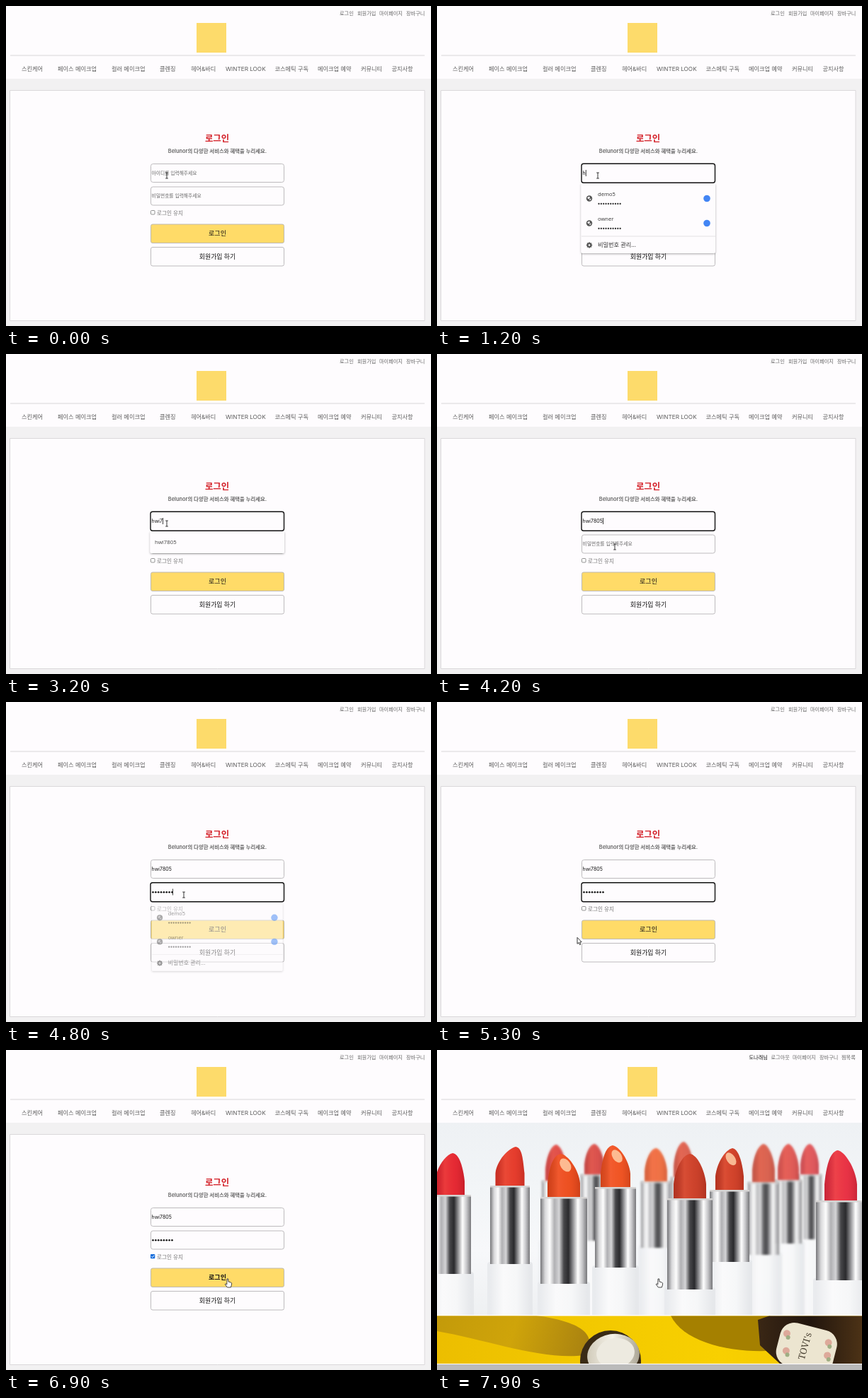
Animation, 600 px wide and 453 px high, one loop 8 s. Source, as an HTML page with a canvas:

```html
<!DOCTYPE html>
<html lang="ko">
<head>
<meta charset="utf-8">
<title>로그인</title>
<style>
  html, body { margin: 0; width: 100%; height: 100%; overflow: hidden; background: #fefcfe; }
  canvas { display: block; width: 600px; height: 453px; }
</style>
</head>
<body>
<canvas id="stage" width="600" height="453"></canvas>
<script>
const ctx = document.getElementById('stage').getContext('2d');
const LOOP = 8000, STEP = 100;
const WHITE = '#fefcfe', GREY = '#666', INK = '#111';
const UI = 'Inter, "Noto Sans CJK KR", "Noto Sans CJK", sans-serif';
const MENU = '"Open Sans", "Noto Sans CJK KR", "Noto Sans CJK", sans-serif';
const USER = 'hwi7805', SITE = 'Belunor';

// [start time, value]
const TYPED = [[0, 0], [1200, 1], [1600, 0], [2000, 2], [2100, 3], [3200, 4], [3300, 5], [3400, 6], [3700, 7]];
const POPUPS = [
  [0, null], [200, 'saved', 250, .5], [300, 'saved', 250, 1], [1300, 'saved', 250, .5],
  [1400, 'hint', 250, 1], [1600, null], [2000, 'saved', 250, .5], [2100, 'hint', 250, 1],
  [3700, 'hint', 250, .5], [3800, null], [4300, 'saved', 283, .5], [4400, 'saved', 283, 1],
  [4800, 'saved', 283, .5], [4900, null]
];
const MOUSE = [
  [0, 227, 240], [3700, 227, 240], [3900, 186, 256], [4200, 251, 273], [4900, 251, 273],
  [5100, 158, 300], [5400, 212, 345], [5600, 212, 345], [5900, 204, 290], [6300, 204, 290],
  [6800, 313, 324], [LOOP, 313, 324]
];

const at = (list, t) => list.filter(k => k[0] <= t).pop();
const within = (t, a, b) => t >= a && t < b;

function rect(x, y, w, h, fill) {
  ctx.fillStyle = fill;
  ctx.fillRect(x, y, w, h);
}

function box(x, y, w, h, r, fill, stroke, line = 1) {
  ctx.beginPath();
  ctx.roundRect(x, y, w, h, r);
  paint(fill, stroke, line);
}

function paint(fill, stroke, line = 1) {
  if (fill) { ctx.fillStyle = fill; ctx.fill(); }
  if (stroke) { ctx.strokeStyle = stroke; ctx.lineWidth = line; ctx.stroke(); }
}

function disc(x, y, r, fill) {
  ctx.beginPath();
  ctx.arc(x, y, r, 0, 7);
  paint(fill);
}

function oval(x, y, rx, ry, turn, fill) {
  ctx.beginPath();
  ctx.ellipse(x, y, rx, ry, turn, 0, 7);
  paint(fill);
}

function poly(points, fill, stroke, line) {
  ctx.beginPath();
  points.forEach(([x, y]) => ctx.lineTo(x, y));
  ctx.closePath();
  paint(fill, stroke, line);
}

function text(s, x, y, size, color = GREY, weight = 400, align = 'left', family = UI) {
  ctx.font = `${weight} ${size}px ${family}`;
  ctx.textAlign = align;
  ctx.textBaseline = 'alphabetic';
  ctx.fillStyle = color;
  ctx.fillText(s, x, y + size * .36);
  return ctx.measureText(s).width;
}

function dots(x, y, count, gap, r, color) {
  for (let i = 0; i < count; i++) disc(x + i * gap, y, r, color);
}

function fade(x0, y0, x1, y1, ...colors) {
  const g = ctx.createLinearGradient(x0, y0, x1, y1);
  colors.forEach((c, i) => g.addColorStop(i / (colors.length - 1), c));
  return g;
}

function header(links) {
  rect(0, 0, 600, 103, WHITE);
  links.forEach(([s, x], i) => text(s, x, 10.7, 7.15, links.length > 4 && !i ? INK : GREY));
  rect(269, 24, 42, 42, '#fddb6b');
  rect(6, 69.5, 585, 1, '#d9d7d9');
  [['스킨케어', 22], ['페이스 메이크업', 73], ['컬러 메이크업', 149], ['클렌징', 217],
   ['헤어&바디', 261], ['WINTER LOOK', 310], ['코스메틱 구독', 379.5], ['메이크업 예약', 440],
   ['커뮤니티', 501], ['공지사항', 544.5]
  ].forEach(([s, x]) => text(s, x, 88.7, 8.2, '#5c5c5c'));
}

function field(y, focused) {
  if (focused) box(204, y + .2, 188.5, 27, 3, WHITE, INK, 1.4);
  else box(204.5, y + .5, 188, 26, 3, WHITE, '#bdbbbd');
}

function caret(x, y) { rect(x, y, .8, 9, INK); }

function globe(x, y) {
  disc(x, y, 4.2, '#555');
  poly([[x - 3, y - 1], [x, y - 3], [x + 1, y - 1], [x - 1, y + 1]], WHITE);
  poly([[x, y + 1], [x + 3, y], [x + 1, y + 3]], WHITE);
}

function gear(x, y) {
  for (let i = 0; i < 8; i++) {
    const a = i * Math.PI / 4;
    disc(x + 3.3 * Math.cos(a), y + 3.3 * Math.sin(a), 1, '#555');
  }
  disc(x, y, 3.2, '#555');
  disc(x, y, 1.3, WHITE);
}

// The shadow is kept outside the panel so that it does not show through while fading.
function panel(y, h) {
  const shape = [203.5, y + 1, 189.5, h, 2];
  ctx.save();
  ctx.beginPath();
  ctx.rect(190, y - 10, 220, h + 30);
  ctx.roundRect(...shape);
  ctx.clip('evenodd');
  ctx.shadowColor = 'rgba(0,0,0,.35)';
  ctx.shadowBlur = 3;
  ctx.shadowOffsetY = 1;
  box(...shape, WHITE);
  ctx.restore();
  box(...shape, WHITE);
}

function popup([, kind, y, alpha]) {
  if (!kind) return;
  ctx.save();
  ctx.globalAlpha = alpha;
  if (alpha < 1) {
    ctx.translate(298, y + 14);
    ctx.scale(.975, .975);
    ctx.translate(-298, -y - 14);
  }
  if (kind === 'hint') {
    panel(y, 31);
    text(USER, 210, y + 16, 7.8, '#444', 400, 'left', MENU);
  } else {
    panel(y, 99);
    ['demo5', 'owner'].forEach((name, i) => {
      const row = y + 16 + i * 35;
      globe(215, row + 6.5);
      text(name, 227, row, 7.6, '#333', 400, 'left', MENU);
      dots(228.5, row + 14, 10, 3.35, 1.15, '#333');
      disc(381, row + 6.5, 4.8, '#4285f4');
    });
    rect(204, y + 75.5, 189, 1, '#e6e4e6');
    gear(215, y + 88.5);
    text('비밀번호 관리...', 227, y + 88, 8.2, '#333', 400, 'left', MENU);
  }
  ctx.restore();
}

function mouseAt(t) {
  const i = MOUSE.findIndex(k => k[0] > t);
  const [t0, x0, y0] = MOUSE[i - 1], [t1, x1, y1] = MOUSE[i];
  const u = (t - t0) / (t1 - t0), e = u * u * (3 - 2 * u);
  return [x0 + (x1 - x0) * e, y0 + (y1 - y0) * e];
}

function pointer(x, y, kind) {
  ctx.save();
  ctx.translate(x, y);
  if (kind === 'beam') {
    ctx.beginPath();
    ctx.moveTo(-1.8, -4); ctx.lineTo(1.8, -4);
    ctx.moveTo(0, -4); ctx.lineTo(0, 4);
    ctx.moveTo(-1.8, 4); ctx.lineTo(1.8, 4);
    paint(null, '#222', .9);
  } else if (kind === 'hand') {
    poly([[-1, 0], [.7, 0], [1, 4], [4.5, 5], [5.6, 6.2], [5.3, 9], [4.3, 12], [-.6, 12],
          [-3.7, 7.8], [-3, 6.8], [-1.2, 8]], '#fff', '#333', .9);
  } else {
    poly([[0, 0], [0, 9], [2, 7.2], [3.5, 10.3], [5, 9.6], [3.6, 6.6], [6.2, 6.4]], '#fff', '#222', .9);
  }
  ctx.restore();
}

function checkbox(checked) {
  if (!checked) return box(204.5, 289.5, 5.5, 5.5, 1, '#fff', '#777', .8);
  box(204, 289, 6.3, 6.3, 1, '#1a6fdc');
  ctx.beginPath();
  ctx.moveTo(205.3, 292.2); ctx.lineTo(206.7, 293.6); ctx.lineTo(209.2, 290.7);
  paint(null, '#fff', 1);
}

function loginPage(t) {
  const [mx, my] = mouseAt(t);
  const over = y => mx > 204 && mx < 393 && my > y && my < y + 27;
  const onId = within(t, 200, 4300), onPass = within(t, 4300, 5700);
  const filled = t >= 4800;

  rect(0, 103, 600, 350, '#f2f1f2');
  header([['로그인', 471], ['회원가입', 496], ['마이페이지', 527], ['장바구니', 565]]);
  box(5.5, 119.5, 585.5, 326, 0, WHITE, '#dad8da');
  text('로그인', 298, 187.2, 12.4, '#d4222a', 700, 'center');
  text(SITE + '의 다양한 서비스와 혜택을 누리세요.', 298.5, 205, 7.4, GREY, 600, 'center');

  field(223, onId);
  const id = USER.slice(0, at(TYPED, t)[1]);
  if (!id) text('아이디를 입력해주세요', 205.5, 236.5, 6.75, GREY);
  const idWidth = id && text(id, 205.5, 236.5, 7, INK);
  if (within(t, 300, 800) || within(t, 1200, 2600) || within(t, 3200, 4300)) caret(205.7 + +idWidth, 232);

  field(255.5, onPass);
  if (filled) dots(207.5, 269.3, 8, 3.85, 1.3, INK);
  else text('비밀번호를 입력해주세요', 205.5, 269, 6.75, GREY);
  if (within(t, 4300, 5300)) caret(filled ? 235 : 205.7, 264.5);

  checkbox(t >= 6300);
  text('로그인 유지', 213, 293, 7.6, '#777');
  box(204.5, 309, 188, 26.5, 2.5, '#ffdb68', '#bdb9b0');
  text('로그인', 298.5, 322, 9, INK, over(308) ? 700 : 500, 'center');
  box(204.5, 341.5, 188, 26.5, 2.5, WHITE, '#bdbbbd');
  text('회원가입 하기', 298.5, 354.5, 8.9, INK, over(341) ? 700 : 500, 'center');

  popup(at(POPUPS, t));
  const kind = over(223) || over(255) ? 'beam' : over(308) || over(341) ? 'hand' : 'arrow';
  pointer(mx, my, kind);
}

// x: centre, top: tip, rim and foot: ends of the tube, lean: sideways shift of the tip
function lipstick(x, top, rim, foot, half, tube, color, lean = 0, cut = false) {
  const h = rim - top, l = x - half, r = x + half, tip = x + half * lean;
  box(x - tube - 4, foot - 3, tube * 2 + 8, 400 - foot, 4,
    fade(x - tube, 0, x + tube, 0, '#e9ebee', '#fafafb', '#f6f7f8', '#e6e8eb'));
  rect(x - tube, rim, tube * 2, foot - rim,
    fade(x - tube, 0, x + tube, 0, '#77777a', '#d8d8da', '#fdfdfd', '#b0b0b3', '#d4d4d6', '#47474a',
      '#2a2a2d', '#939396', '#ffffff', '#c4c4c7', '#77777a'));
  rect(x - tube, rim, tube * 2, 2.5, '#d6d4d3');
  ctx.beginPath();
  ctx.moveTo(l, rim);
  ctx.lineTo(l, top + h * .68);
  ctx.bezierCurveTo(l + half * .1, top + h * .35, tip - half * .5, top + h * .04, tip, top);
  ctx.bezierCurveTo(tip + half * .45, top + h * .02, r - half * .1, top + h * .35, r, top + h * .68);
  ctx.lineTo(r, rim);
  ctx.closePath();
  paint(color);
  ctx.save();
  ctx.clip();
  rect(l, top, half * 2, h,
    fade(l, 0, r, 0, 'rgba(90,0,0,.2)', 'rgba(255,110,80,.3)', 'rgba(255,90,60,.1)', 'rgba(90,0,0,.2)'));
  ctx.restore();
  if (cut) oval(x + half * .1, top + h * .26, half * .3, h * .17, -.6, 'rgba(255,205,165,.85)');
}

function lipsticks() {
  rect(0, 103, 600, 272, fade(0, 103, 0, 375, '#eef1f4', '#f2f5f7', '#f7f8fa', '#eef0f2'));
  ctx.save();
  ctx.beginPath();
  ctx.rect(0, 103, 600, 272);
  ctx.clip();
  ctx.filter = 'blur(1.8px)';
  ctx.globalAlpha = .85;
  [[168, 134, 185, 272, 15, 20, '#d93230'], [222, 133, 176, 270, 14, 19, '#d23633'],
   [309, 139, 186, 280, 16, 21, '#ee5f28'], [348, 130, 180, 270, 14, 18, '#d64d3a'],
   [526, 133, 176, 268, 13, 17, '#da3f48'], [496, 133, 184, 274, 15, 19, '#db4240'],
   [461, 133, 187, 290, 16, 22, '#d24c38']
  ].forEach(a => lipstick(...a));
  ctx.globalAlpha = 1;
  ctx.filter = 'blur(.7px)';
  lipstick(103, 137, 192, 303, 20.5, 28, '#e23a2c', .4);
  lipstick(252, 135, 194, 308, 21, 29, '#ee5522', -.2, true);
  lipstick(413, 139, 198, 300, 20, 28, '#cb4029', .2, true);
  ctx.filter = 'none';
  lipstick(18, 146, 205, 317, 21, 30, '#e22433', .2);
  lipstick(179, 147, 208, 331, 23, 33, '#ea4f1e', -.2, true);
  lipstick(357, 147, 210, 339, 23, 32, '#c63f29');
  lipstick(570, 142, 213, 326, 23, 35, '#e62f47', -.2);
  ctx.restore();
}

function banner() {
  rect(0, 375, 600, 78, WHITE);
  ctx.save();
  ctx.beginPath();
  ctx.rect(0, 376.5, 600, 67.5);
  ctx.clip();
  rect(0, 376, 600, 68, fade(0, 0, 600, 0, '#ecbe00', '#f2c800', '#f8d000', '#f0c400'));

  ctx.beginPath();
  ctx.moveTo(0, 376);
  ctx.lineTo(140, 376);
  ctx.bezierCurveTo(200, 384, 230, 402, 208, 432);
  ctx.bezierCurveTo(150, 440, 70, 410, 0, 398);
  paint(fade(0, 376, 210, 440, '#c39a0a', '#cfa40a', '#a88110'));
  ctx.beginPath();
  ctx.moveTo(330, 376);
  ctx.lineTo(470, 376);
  ctx.lineTo(490, 424);
  ctx.bezierCurveTo(430, 432, 350, 418, 330, 376);
  paint('#a58000');

  disc(245, 440, 43, '#3a2b16');
  oval(249, 432, 37, 30, -.15, fade(210, 0, 286, 0, '#cfc9b8', '#f5f2e9', '#aaa493'));
  oval(252, 429, 27, 21, -.15, '#edeae0');

  poly([[453, 382], [470, 376], [600, 376], [600, 444], [484, 444], [456, 418]],
    fade(453, 0, 600, 0, '#3a2715', '#21150d', '#4c3216'));
  ctx.translate(523, 417);
  ctx.rotate(.25);
  box(-41, -26, 82, 62, 20, '#ece5d0');
  [[-32, -8], [-27, 16], [28, -10], [31, 8]].forEach(([x, y]) => {
    disc(x, y, 5, '#dda99a');
    disc(x + 3, y + 5, 3, '#9fae83');
  });
  ctx.rotate(-1.55);
  text("TOVI's", -3, -3, 13, '#4b4334', 500, 'center', '"Noto Serif", serif');
  ctx.restore();
  rect(0, 445, 600, 8, '#bababa');
}

function homePage() {
  header([['도나래님', 440.5], ['로그아웃', 471.5], ['마이페이지', 502], ['장바구니', 540], ['찜목록', 571]]);
  lipsticks();
  banner();
  pointer(313, 324, 'hand');
}

function draw(now) {
  const t = Math.floor(now % LOOP / STEP) * STEP;
  if (t < 7900) loginPage(t);
  else homePage();
}

let start;
function tick(now) {
  start ??= now;
  draw(now - start);
  requestAnimationFrame(tick);
}
draw(0);
requestAnimationFrame(tick);
</script>
</body>
</html>
```
